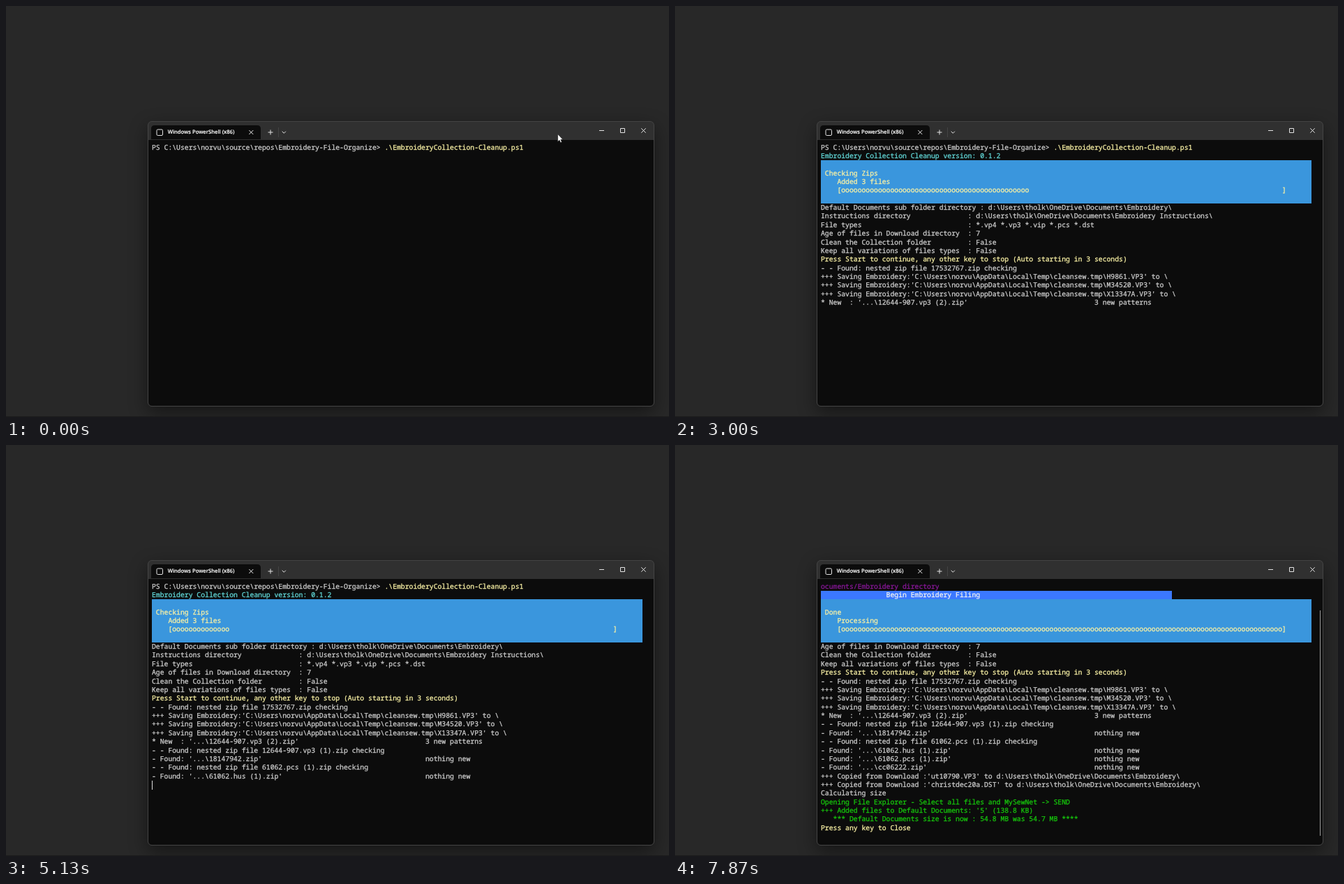
An HTML page that plays this animation: 950 by 589 pixels, repeating every 8000 ms.

```html
<!DOCTYPE html>
<html lang="en">
<head>
<meta charset="utf-8">
<title>Embroidery cleanup</title>
<style>
  html, body { margin: 0; width: 100%; height: 100%; overflow: hidden; background: #282828; }
  #stage { position: relative; width: 950px; height: 589px; overflow: hidden; background: #282828; }
  #stage::after { content: ""; position: absolute; left: 0; top: 588px; width: 950px; height: 1px; background: #1b1b1b; }
  #window {
    position: absolute; left: 203px; top: 165px; width: 724px; height: 407px;
    border: 1px solid #444; border-radius: 6px; overflow: hidden;
    background: linear-gradient(#303030 26px, #0c0c0c 26px);
  }
  #shadow {
    position: absolute; left: 203px; top: 165px; width: 726px; height: 409px;
    border-radius: 6px; box-shadow: 0 9px 27px rgba(0, 0, 0, .45);
  }
  #chrome { position: absolute; left: 0; top: 0; fill: none; stroke: #e4e4e4; }
  #tab {
    position: absolute; left: 231.7px; top: 176px; font: 600 7.62px/11px "Open Sans", sans-serif;
    color: #fff; white-space: pre; text-rendering: geometricPrecision;
    -webkit-text-stroke: .15px;
  }
  #screen {
    position: absolute; left: 0; top: 196.5px; width: 950px; height: 373px; overflow: hidden;
    font: 500 9.763px/12.37px "Noto Sans Mono", "DejaVu Sans Mono", monospace;
    text-rendering: geometricPrecision; font-variant-ligatures: none; color: #ccc;
    -webkit-text-stroke: .3px;
  }
  #lines { position: absolute; left: 209px; top: 0; }
  #lines div, #progress div { position: absolute; height: 12.37px; white-space: pre; }
  #progress {
    position: absolute; left: 209px; top: 24.74px; width: 703px; height: 61.85px;
    background: #3a96dd; color: #f9f1a5;
  }
  #caret { position: absolute; width: 1px; height: 13px; background: #ddd; }
  #scrollbar { position: absolute; left: 924px; top: 237px; width: 1px; height: 323px; background: #9e9e9e; }
  .yellow { color: #f9f1a5; }
  .cyan { color: #61d6d6; }
  .purple { color: #881798; }
  .green { color: #16c60c; }
  .banner { color: #f2f2f2; background: #3b78ff; }
  [hidden] { display: none; }
</style>
</head>
<body>
<div id="stage">
  <div id="shadow"></div>
  <div id="window"></div>
  <svg id="chrome" width="950" height="589">
    <path d="M208 191V176q0-5 5-5H360q5 0 5 5V191Z" fill="#0c0c0c" stroke="none"/>
    <rect x="216" y="177" width="8.5" height="8.5" rx="1.5"/>
    <path d="M348.3 178l6 6m0-6l-6 6M375.5 181h7m-3.500-3.500v7"/>
    <path d="M390.500 174v14" stroke="#444"/>
    <path d="M395.700 179.700l2.600 2.600l2.600-2.600M850 178.500h7M880.500 175.500h6v6h-6ZM910.300 175.300l6.400 6.400m0-6.400l-6.400 6.400"/>
  </svg>
  <div id="tab">Windows PowerShell (x86)</div>
  <div id="screen">
    <div id="lines"></div>
    <div id="progress"></div>
  </div>
  <div id="caret"></div>
  <div id="scrollbar"></div>
  <svg id="mouse" width="12" height="16" style="position:absolute">
    <path d="M.6 .6V11.400L3 9.200L4.600 12.800L6.400 12L4.900 8.500H8Z" fill="#fff" stroke="#111" stroke-width=".6"/>
  </svg>
</div>
<script>
const LOOP = 8000, ROW = 12.37, COLUMN = 5.858, LEFT = 209, TOP = 196.5;
const VISIBLE_LINES = 29, BAR_WIDTH = 108;
const $ = id => document.getElementById(id);

const localTemp = 'C:\\Users\\norvu\\AppData\\Local\\Temp\\';
const documents = 'd:\\Users\\tholk\\OneDrive\\Documents\\';

const setting = (name, value) => [['', name.padEnd(36) + ': ' + value]];
const nested = file => [['', `- - Found: nested zip file ${file} checking`]];
const saving = file => [['', `+++ Saving Embroidery:'${localTemp}cleansew.tmp\\${file}' to \\`]];
const zip = (label, file, result) => [['', `${label}: '...\\${file}'`.padEnd(67) + result]];
const copied = file => [['', `+++ Copied from Download :'${file}' to ${documents}Embroidery\\`]];
const say = (color, text) => [[color, text]];

// Each line is a list of [color, text] runs.
const lines = [
  [['', 'PS C:\\Users\\norvu\\source\\repos\\Embroidery-File-Organize> '],
   ['yellow', '.\\EmbroideryCollection-Cleanup.ps1']],
  say('cyan', 'Embroidery Collection Cleanup version: 0.1.2'),
  say('purple', 'Organize your new embroidery patterns: unpack the zip files in Downloads and file every new pattern in the user folder D'),
  say('purple', 'ocuments/Embroidery directory'),
  say('banner', ' '.repeat(16) + 'Begin Embroidery Filing'.padEnd(70)),
  setting('Download source directory', 'C:\\Users\\norvu\\Downloads'),
  setting('Collection directory', documents + 'Embroidery\\'),
  say('', `Default Documents sub folder directory : ${documents}Embroidery\\`),
  setting('Instructions directory', documents + 'Embroidery Instructions\\'),
  setting('File types', '*.vp4 *.vp3 *.vip *.pcs *.dst'),
  setting('Age of files in Download directory', 7),
  setting('Clean the Collection folder', 'False'),
  setting('Keep all variations of files types', 'False'),
  say('yellow', 'Press Start to continue, any other key to stop (Auto starting in 3 seconds)'),
  nested('17532767.zip'),
  saving('H9861.VP3'),
  saving('M34520.VP3'),
  saving('X13347A.VP3'),
  zip('* New  ', '12644-907.vp3 (2).zip', '3 new patterns'),
  nested('12644-907.vp3 (1).zip'),
  zip('- Found', '18147942.zip', 'nothing new'),
  nested('61062.pcs (1).zip'),
  zip('- Found', '61062.hus (1).zip', 'nothing new'),
  zip('- Found', '61062.pcs (1).zip', 'nothing new'),
  zip('- Found', 'cc06222.zip', 'nothing new'),
  copied('ut10790.VP3'),
  copied('christdec20a.DST'),
  say('', 'Calculating size'),
  say('green', 'Opening File Explorer - Select all files and MySewNet -> SEND'),
  say('green', "+++ Added files to Default Documents: '5' (138.8 KB)"),
  say('green', '   *** Default Documents size is now : 54.8 MB was 54.7 MB ****'),
  say('yellow', 'Press any key to Close'),
];

const bar = (title, status, filled) => ({ bar: [title, status, filled] });
const working = (title, filled) => bar(title, 'Processing', filled);
const checking = filled => bar('Checking Zips', 'Added 3 files', filled);
const expanding = (name, filled) =>
  bar('Expand-Archive', `The archive file '${localTemp}${name}.tmp.zip' expansion is in progress...`, filled);
const on = { caret: true }, off = { caret: false };
const upTo = count => ({ count });

// Every step keeps the earlier state and changes only what it names.
const steps = [
  [0, { count: 1, caret: false, bar: null, mouse: [789.5, 183] }],
  [70, { mouse: [774, 202] }],
  [130, { mouse: null }],
  [270, on], [800, off],
  [1000, upTo(5)],
  [1070, upTo(14), on],
  [1600, off], [1800, on],
  [2070, working('Calculating size', 27)],
  [2200, working('Checking Zips', 46)],
  [2400, off],
  [2730, expanding('tmp91B2', 54)],
  [2800, upTo(15), expanding('tmp91B2', 90)],
  [2870, upTo(17)],
  [2930, upTo(19), on, checking(46)],
  [3000, off],
  [3470, expanding('tmp5E07', 36)],
  [3530, expanding('tmp5E07', 72)],
  [3600, upTo(20), on, expanding('tmp5E07', 104)],
  [3670, checking(50)],
  [3730, upTo(21)],
  [3800, expanding('tmp3CC6', 27)],
  [3870, expanding('tmp3CC6', 54)],
  [3930, upTo(22), expanding('tmp3CC6', 81)],
  [4000, expanding('tmp3CC6', 104)],
  [4070, checking(9)],
  [4130, expanding('tmp7D1A', 36)],
  [4200, expanding('tmp7D1A', 72)],
  [4270, expanding('tmp7D1A', 96)],
  [4330, expanding('tmp7D1A', 103)],
  [4400, checking(11)],
  [4470, upTo(23)],
  [4530, checking(14)],
  [4600, off], [5130, on],
  [5270, upTo(24), checking(18)],
  [5330, upTo(25), checking(23)],
  [5400, upTo(26), working('Copying from Downloads', 9)],
  [5470, upTo(27), working('Copying from Downloads', 18)],
  [5670, off], [6200, on], [6800, off], [7330, on],
  [7600, upTo(29), working('Calculating size', 27)],
  [7800, upTo(31), working('Done', BAR_WIDTH)],
  [7870, upTo(32), off],
];

const states = [];
for (const [time, ...changes] of steps)
  states.push(Object.assign({}, states.at(-1), ...changes, { time }));

function addRow(parent, row, column = 0) {
  const div = document.createElement('div');
  div.style.top = row * ROW + 'px';
  div.style.left = column * COLUMN + 'px';
  return parent.appendChild(div);
}

const rows = lines.map((runs, i) => {
  const row = addRow($('lines'), i);
  if (runs.length === 1) row.className = runs[0][0];
  for (const [color, text] of runs) {
    const span = document.createElement('span');
    span.className = color === 'banner' ? '' : color;
    span.textContent = text;
    row.append(span);
  }
  return row;
});
const [titleRow, statusRow, barRow] = [[1, 1], [2, 4], [3, 4]].map(at => addRow($('progress'), ...at));

function render({ count, caret, bar, mouse }) {
  const scroll = Math.max(0, count - VISIBLE_LINES);
  rows.forEach((row, i) => { row.hidden = i >= count; });
  $('lines').style.top = -scroll * ROW + 'px';
  $('scrollbar').hidden = !scroll;

  $('progress').hidden = !bar;
  if (bar) {
    const [title, status, filled] = bar;
    titleRow.textContent = title;
    statusRow.textContent = status;
    barRow.textContent = `[${'o'.repeat(filled).padEnd(BAR_WIDTH)}]`;
  }

  // The caret waits behind the typed command until output begins.
  const [column, line] = count === 1 ? [92, 0] : [0, count - scroll];
  $('caret').hidden = !caret;
  $('caret').style.left = Math.floor(LEFT + column * COLUMN + .1) + 'px';
  $('caret').style.top = Math.floor(TOP + line * ROW + .01) + 'px';

  $('mouse').style.display = mouse ? '' : 'none';
  if (mouse) [$('mouse').style.left, $('mouse').style.top] = mouse.map(v => v + 'px');
}

const start = performance.now();
let shown;
function tick() {
  const time = (performance.now() - start) % LOOP;
  const state = states.findLast(s => s.time <= time) || states[0];
  if (state !== shown) render(shown = state);
  requestAnimationFrame(tick);
}
tick();
</script>
</body>
</html>
```
